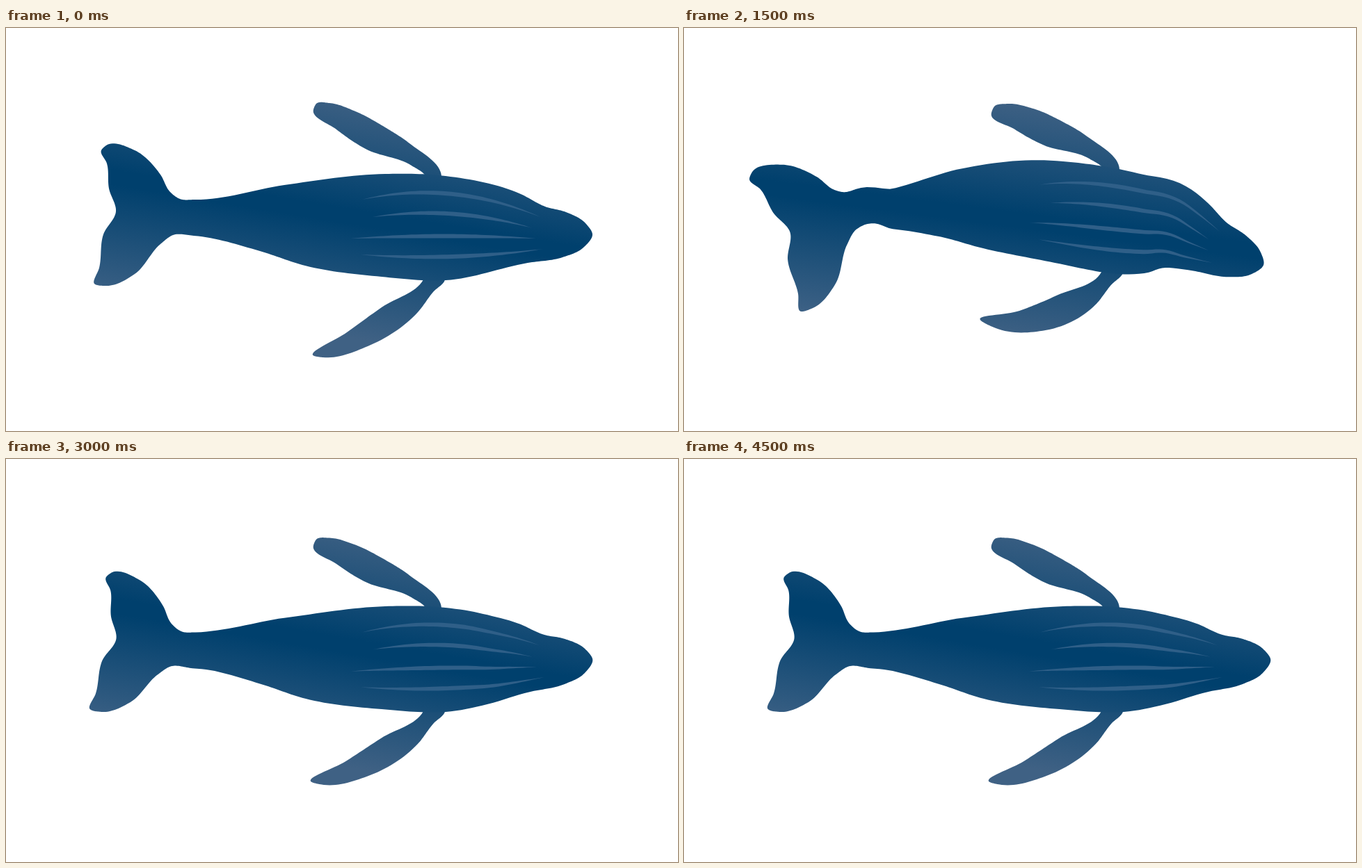
Write an HTML page with a canvas that moves like this. It is 966 px wide and 580 px high and loops after 4650 ms.

```html
<!DOCTYPE html>
<html lang="en">
<head>
<meta charset="utf-8">
<title>Swimming whale</title>
<style>
  html, body { margin: 0; width: 100%; height: 100%; overflow: hidden; background: #fff; }
  canvas { display: block; }
</style>
</head>
<body>
<canvas id="stage" width="966" height="580"></canvas>
<script>
const ctx = document.getElementById('stage').getContext('2d');
const LOOP = 4650, STEP = 150, DIVE = 2700, RISE = 2100;

// Resting outlines; every pose is bent from these
const BODY = [
  [272, 247], [400, 226], [545, 210], [632, 213], [740, 239], [775, 257], [805, 265],
  [833, 281], [843, 297], [830, 316], [800, 330], [750, 338], [632, 363], [540, 358],
  [430, 342], [365, 321], [270, 299], [240, 298], [222, 311], [185, 354], [145, 371],
  [127, 368], [134, 345], [140, 297], [158, 264], [148, 231], [145, 195], [137, 176],
  [144, 169], [185, 176], [222, 211], [236, 236], [250, 246]
];
const TOP_FIN = [
  [626, 214], [580, 166], [545, 143], [500, 119], [465, 108], [446, 109], [442, 117],
  [475, 146], [517, 174], [583, 198], [604, 214], [608, 235], [622, 235]
];
const LOW_FIN = [
  [631, 362], [614, 380], [592, 409], [520, 458], [455, 474], [443, 472],
  [490, 438], [540, 402], [600, 362], [608, 340], [622, 340]
];
// Start, middle control height, end
const GROOVES = [
  { a: [512, 247], mid: 218, b: [768, 272] },
  { a: [527, 272], mid: 255, b: [757, 288] },
  { a: [496, 303], mid: 296, b: [762, 303] },
  { a: [510, 326], mid: 336, b: [772, 318] }
];

const smooth = v => {
  const u = Math.max(0, Math.min(1, v));
  return u * u * (3 - 2 * u);
};

function turn([x, y], [cx, cy], degrees, scale = 1) {
  const a = degrees * Math.PI / 180, dx = x - cx, dy = y - cy;
  const c = Math.cos(a) * scale, s = Math.sin(a) * scale;
  return [cx + dx * c - dy * s, cy + dx * s + dy * c];
}

// s runs from -1 (head up) to 1 (head down)
const arch = (x, s) =>
  -(16 * s + 9 * s * s) * Math.exp(-(((Math.max(x, 245) - 440) / 185) ** 2));

function bendBody(p, s) {
  const head = smooth((p[0] - 660) / 70), tail = smooth((300 - p[0]) / 50);
  const lift = arch(p[0], s);
  let q = turn(p, [700, 288], (17 * s + s * s) * head);
  q = turn(q, [245, 272], -(21 * s + 3 * s * s) * tail, 1 + (0.04 * s + 0.02 * s * s) * tail);
  return [q[0] - 5 * Math.abs(s) * tail, q[1] + lift];
}

// Fins curl more towards the tip
function bendFin([x, y], s, curl, sweep) {
  const u = Math.max(0, (615 - x) / 173) ** 2;
  return [x - sweep * u, y + curl * u + arch(615, s)];
}

// Points along a closed curve with chord-weighted tangents
function curve(points) {
  const n = points.length, out = [];
  const at = i => points[(i + n) % n];
  const dist = (a, b) => Math.hypot(b[0] - a[0], b[1] - a[1]);
  const tangent = i => {
    const a = at(i - 1), b = at(i), c = at(i + 1), l = dist(a, b), r = dist(b, c);
    return [0, 1].map(k => ((b[k] - a[k]) / l * r + (c[k] - b[k]) / r * l) / (l + r));
  };
  for (let i = 0; i < n; i++) {
    const a = at(i), b = at(i + 1), ta = tangent(i), tb = tangent(i + 1), d = dist(a, b);
    for (let u = 0; u < 1; u += 1 / 16) {
      const h = smooth(u), v = u * (1 - u) * d;
      out.push([0, 1].map(k => a[k] + (b[k] - a[k]) * h + v * (ta[k] * (1 - u) - tb[k] * u)));
    }
  }
  return out;
}

function groove({ a, mid, b }) {
  const upper = [], lower = [];
  for (let i = 0; i <= 40; i++) {
    const u = i / 40, v = 1 - u, half = 3 * Math.sin(Math.PI * u);
    const x = a[0] * v + b[0] * u;
    const y = a[1] * v * v + 2 * mid * u * v + b[1] * u * u;
    upper.push([x, y - half]);
    lower.unshift([x, y + half]);
  }
  return [...upper, ...lower];
}

const body = curve(BODY), topFin = curve(TOP_FIN), lowFin = curve(LOW_FIN);
const grooves = GROOVES.map(groove);

function fill(points, paint) {
  ctx.beginPath();
  points.forEach(p => ctx.lineTo(...p));
  ctx.closePath();
  ctx.fillStyle = paint;
  ctx.fill();
}

// Dark along the spine, lighter to both sides
function shade(s, edge, core) {
  const slope = 0.165 - 0.035 * s, reach = 170;
  const x = 480, y = 305 - 220 * slope;
  const g = ctx.createLinearGradient(x + reach * slope, y - reach, x - reach * slope, y + reach);
  g.addColorStop(0, edge);
  g.addColorStop(0.47, core);
  g.addColorStop(0.53, core);
  g.addColorStop(1, edge);
  return g;
}

const swing = u => (1 - Math.cos(2 * Math.PI * u)) / 2;

function draw(t) {
  const s = t < DIVE ? swing(t / DIVE) / 0.97 : -swing((t - DIVE) / RISE) / 0.95;
  const topCurl = s < 0 ? -30 * s : 25 * Math.sin(2.5 * s);
  const beat = Math.abs(s);
  const finPaint = shade(s, '#3f6184', '#05436f');
  ctx.fillStyle = '#fff';
  ctx.fillRect(0, 0, 966, 580);
  fill(topFin.map(p => bendFin(p, s, topCurl, 0)), finPaint);
  fill(lowFin.map(p => bendFin(p, s, -40 * beat, 15 * beat)), finPaint);
  fill(body.map(p => bendBody(p, s)), shade(s, '#3d6185', '#00406d'));
  grooves.forEach(g => fill(g.map(p => bendBody(p, s)), '#2f5f88'));
}

function tick() {
  draw(Math.floor(performance.now() % LOOP / STEP) * STEP);
  requestAnimationFrame(tick);
}
tick();
</script>
</body>
</html>
```
